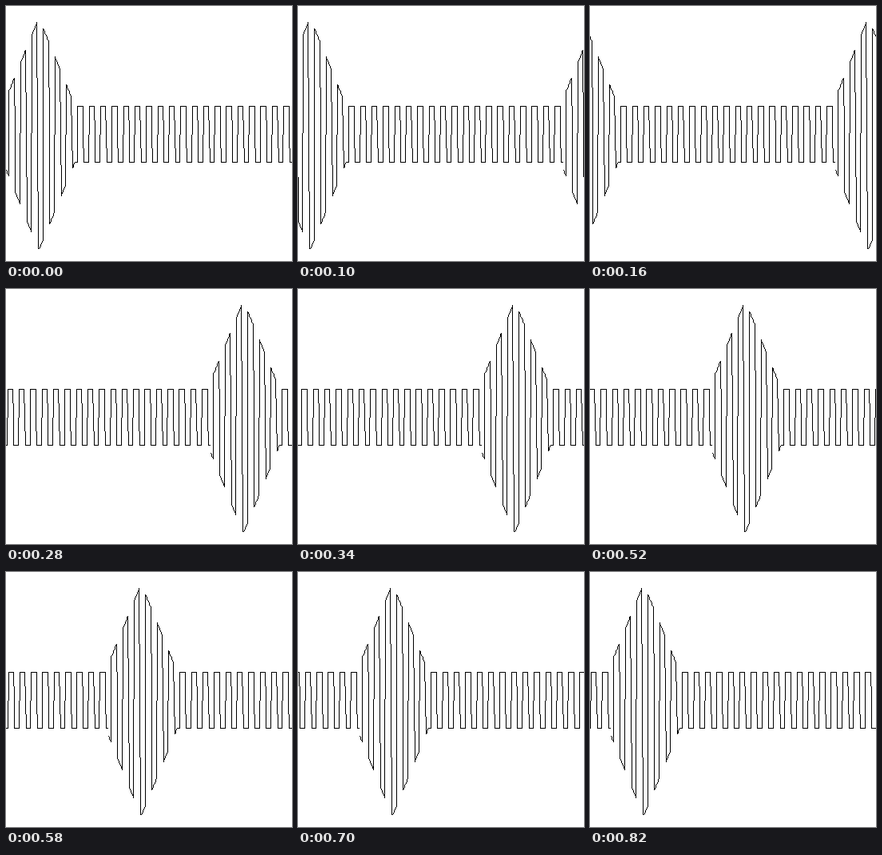
Recreate the animation shown at these times as an HTML page with a canvas. Size 358 by 319 pixels, loop 0.88 s.

```html
<!DOCTYPE html>
<html lang="en">
<head>
<meta charset="utf-8">
<title>Travelling pulse</title>
<style>
html, body { margin: 0; width: 100%; height: 100%; overflow: hidden; background: #fff; }
canvas { display: block; image-rendering: pixelated; }
</style>
</head>
<body>
<canvas id="stage" width="358" height="319"></canvas>
<script>
const W = 358, H = 319, MID = 160, SAMPLES = 500, CYCLE = 20;
const STEPS = 14, HOLD = 100, STEP = 60, LOOP = HOLD + (STEPS - 1) * STEP;

const stage = document.getElementById('stage').getContext('2d');
const wave = document.createElement('canvas');
wave.width = W;
wave.height = H;
const pen = wave.getContext('2d');

// High for half a cycle, one sample at zero on the way down, then low.
function level(i) {
  const phase = i % CYCLE;
  return phase < 5 ? -1 : Math.sign(15 - phase);
}

// Square wave with a swell at the start.
function sample(i) {
  const amp = Math.max(35, 1.75 * (26 + Math.min(i, 56, 114 - i)));
  return [Math.floor(i * W / SAMPLES + 0.3), Math.floor(MID - level(i) * amp)];
}

// One-pixel line without antialiasing.
function line([x0, y0], [x1, y1]) {
  const n = Math.max(Math.abs(x1 - x0), Math.abs(y1 - y0), 1);
  for (let k = 0; k <= n; k++) {
    pen.fillRect(Math.round(x0 + (x1 - x0) * k / n), Math.round(y0 + (y1 - y0) * k / n), 1, 1);
  }
}

pen.fillStyle = '#000';
for (let i = 1; i < SAMPLES; i++) line(sample(i - 1), sample(i));

function draw(ms) {
  const t = ms % LOOP;
  const step = t < HOLD ? 0 : 1 + Math.floor((t - HOLD) / STEP);
  const shift = Math.round(step * W / STEPS);
  stage.fillStyle = '#fff';
  stage.fillRect(0, 0, W, H);
  stage.drawImage(wave, -shift, 0);
  stage.drawImage(wave, W - shift, 0);
}

const start = performance.now();
function tick() {
  draw(performance.now() - start);
  requestAnimationFrame(tick);
}
tick();
</script>
</body>
</html>
```
